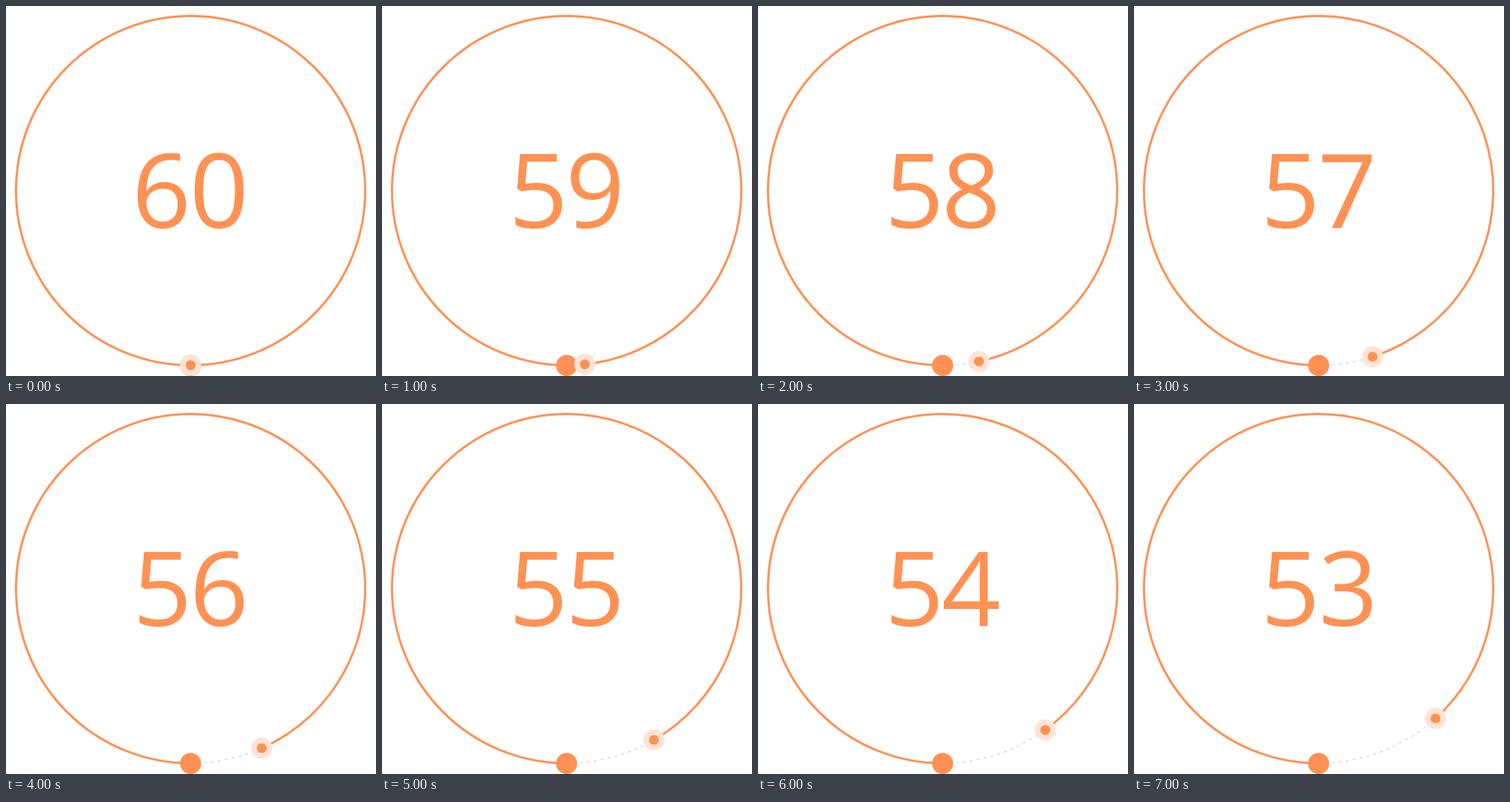
An HTML page that plays this animation: 500 px wide and 500 px high, repeating every 8000 ms.

```html
<!DOCTYPE html>
<html lang="en">
<head>
<meta charset="utf-8">
<title>Countdown ring</title>
<style>
  html, body { margin: 0; width: 100%; height: 100%; overflow: hidden; background: #fff; }
  svg { display: block; width: 100vw; height: 100vh; }
  text { font: 400 140px "Open Sans", "Noto Sans", sans-serif; fill: #ff9153; }
</style>
</head>
<body>
<svg viewBox="0 0 500 500">
  <circle cx="249.5" cy="249.5" r="236" fill="none" stroke="#c4c4c4" stroke-width="1"
    stroke-dasharray="4 5.5" stroke-dashoffset="-18" transform="rotate(90 249.5 249.5) matrix(1 0 0 -1 0 499)"/>
  <path id="arc" fill="none" stroke="#ff9153" stroke-width="3"/>
  <circle cx="249.5" cy="485.8" r="14.3" fill="#ff9153"/>
  <g id="knob">
    <circle r="14.3" fill="#fee4d6"/>
    <circle r="6.7" fill="#ff9153"/>
  </g>
  <text id="tens" y="300"></text>
  <text id="ones" y="300"></text>
</svg>
<script>
  const C = 249.5, R = 236, STEP = 1000, LOOP = 8000;
  const el = id => document.getElementById(id);
  const arc = el('arc'), knob = el('knob'), tens = el('tens'), ones = el('ones');

  // Angle in degrees, counter-clockwise from the bottom of the ring
  const point = deg => {
    const a = deg * Math.PI / 180;
    return [C + R * Math.sin(a), C + R * Math.cos(a)].map(v => v.toFixed(2)).join(' ');
  };

  const arcTo = deg => `A${R} ${R} 0 0 0 ${point(deg)}`;

  function put(node, digit, x) {
    node.textContent = digit;
    node.setAttribute('x', x);
  }

  function draw(t) {
    const n = Math.floor(t % LOOP / STEP), deg = n * 6;
    const left = String(60 - n);
    arc.setAttribute('d', `M${point(deg)}${arcTo(180)}${arcTo(270)}${arcTo(360)}`);
    knob.setAttribute('transform', `translate(${point(deg)})`);
    put(tens, left[0], left[0] === '5' ? 171.2 : 170);
    put(ones, left[1], left[1] === '3' ? 249.5 : 248);
  }

  const start = performance.now();
  function tick(now) {
    draw(Math.max(0, now - start));
    requestAnimationFrame(tick);
  }
  draw(0);
  requestAnimationFrame(tick);
</script>
</body>
</html>
```
